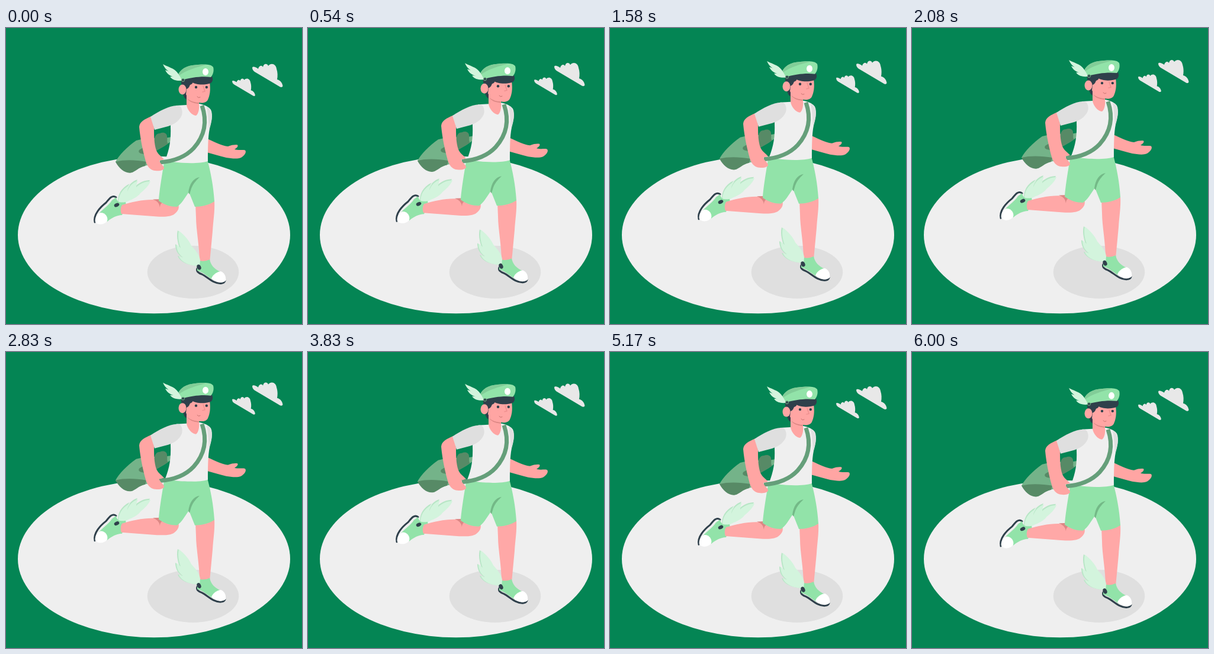
An HTML page for the animation above (6040 ms loop, 500 px wide and 500 px high).

```html
<!DOCTYPE html>
<html lang="en">
<head>
<meta charset="utf-8">
<title>Winged runner</title>
<style>
html, body { margin: 0; width: 100%; height: 100%; overflow: hidden; background: #048554; }
svg { display: block; width: 100vw; height: 100vh; }
.skin { fill: #ffa5a3; }
.leg { fill: #ffa8a7; }
.green { fill: #92e3a9; }
.dark { fill: #2f404b; }
.white { fill: #fff; }
.light { fill: #efefef; }
.cloud { fill: #e8e8e8; }
.shade { fill: #dfdfdf; }
.bag { fill: #74b389; }
.deep { fill: #578a66; }
.wing { fill: #d3f4dd; }
.wing-edge { fill: #b8e6c6; }
.fold { fill: #73b987; }
.blush { fill: #db8784; }
.line { fill: none; stroke-linecap: round; }
.ink { stroke: #2f404b; }
</style>
</head>
<body>
<svg viewBox="0 0 500 500">
  <defs>
    <path id="cloud" d="M416 67C417 64 422 66 426 69C427 64 432 62 434 66C435 60 441 59 443 64C448 58 456 61 457 69C459 75 459 81 458 87C463 88 467 93 467.500 98C467 100 465 100.500 463 99.500L420 74Q416 71 416 67Z"/>
    <path id="backWing" d="M189 297C188 282 194 270 209 263C206 267 204 270 204 274C207 265 213 259 222 256C220 260 219 263 219 267C225 261 234 257 243 257C240 265 232 272 226 277C222 283 212 288 206 290C200 293 195 296 189 297Z"/>
    <path id="frontWing" d="M325 403C318 400 305 401 296 393C293 390 291 388 290 385L297 387C290 382 286 375 286 365L293 371C289 360 288 350 290 342C300 350 307 358 311 367C317 374 325 382 326 392Z"/>
    <path id="hatWing" d="M297 88C290 89 281 88 277 82L283 82C276 80 271 76 269 71L275 73C270 70 267 66 265 61C272 65 280 67 285 71C289 74 291 78 293 81Z"/>
  </defs>

  <ellipse class="light" cx="250" cy="349.400" rx="230" ry="132.800"/>
  <ellipse class="shade" cx="316" cy="412.300" rx="77.200" ry="44.600"/>

  <g id="floating">
    <use href="#cloud" class="cloud"/>
    <use href="#cloud" class="cloud" transform="translate(67.900 39.500) scale(.755)"/>

    <!-- satchel -->
    <path class="bag" d="M185 226C190 216 205 200 220 190C240 184 260 188 280 184L278 192C268 200 258 204 250 210L246 231C233 232 224 236 213 244C202 244 193 236 185 226Z"/>
    <path class="deep" d="M251 188C251 183 254 178 260 178C266 175 272 178 272 183C273 189 271 193 274 195C267 201 258 204 250 210L240 216L232 213C228 212 222 211 225 206C232 201 244 198 251 188Z"/>
    <path class="deep" d="M185 226C200 222 220 223 237 226L235 233C224 235 219 243 211 244.500C202 246 191 238 185 226Z"/>

    <!-- rear leg -->
    <use href="#backWing" class="wing-edge"/>
    <use href="#backWing" class="wing" transform="translate(1 2)"/>
    <path class="line ink" stroke-width="3" d="M186 286C179 281 174 289 169 295C160 302 147 315 150 328"/>
    <path class="green" d="M186 286Q187 292 191 294Q197 295 202 294L203 299L196 316C187 316 178 321 171 327L154 317C160 308 174 300 179 291Z"/>
    <path class="leg" d="M196 299C215 293 240 288 259 291L290 294C294 303 291 308 287 312C281 319 269 319 255 318.500L195 314Q192 306 196 299Z"/>
    <path class="blush" d="M248 289.500L264 289L266 294Q260 296 260 303Q259 293 248 289.500Z"/>
    <path class="white" d="M151 328C149 322 154 314 159 312C167 311 173 319 171 326C167 332 156 334 151 328Z"/>
    <ellipse class="dark" cx="187" cy="299" rx="4.500" ry="3" transform="rotate(-25 187 299)"/>

    <!-- standing leg -->
    <path class="leg" d="M320 297L352 292C353 310 350 325 349 343L344 396H327C327 370 321 340 321 320Z"/>
    <path class="line ink" stroke-width="3" d="M323 406C321 411 325 414 331 416C341 421 350 432 363 431.500Q369 431 370 427"/>
    <path class="green" d="M327 393Q336 395 344 391C346 401 352 407 362 412L349 425C340 420 333 412 323 410Q322 401 327 393Z"/>
    <path class="white" d="M347 423C350 416 356 412 363 411C370 414 372 421 371 427C366 432 354 430 347 423Z"/>
    <use href="#frontWing" class="wing-edge"/>
    <use href="#frontWing" class="wing" transform="translate(2 .5)"/>
    <ellipse class="dark" cx="326" cy="404" rx="3.300" ry="4.700" transform="rotate(-25 326 404)"/>

    <!-- far arm and shorts -->
    <path class="skin" d="M341 187.500C355 194 365 199 375 200C382 197 388 197 391 197.500C393 200 389 203 386 205C393 207 400 205 404 206.500C407 210 402 216 397 219C390 222 380 220 372 219C360 216 350 213 339 210Z"/>
    <path class="green" d="M268 222C290 229 325 230 340 222C346 245 350 265 352 293C343 299 330 302 319 302L309 277C300 290 297 296 289 302C278 302 268 299 258 292C259 275 264 245 268 222Z"/>
    <path class="fold" d="M308 278C310 263 316 254 327 252Q316 262 313 271L310 281Z"/>

    <!-- shirt -->
    <path class="light" d="M287 131L305 130L327 128Q341 131 346 138C350 146 347 160 344 170C341 185 341 205 341 225C325 230 290 229 269 223C276 205 279 190 278 165Z"/>
    <path class="shade" d="M339 133C347 137 349 147 347 157L343 172Q342 150 339 133Z"/>
    <path class="line" stroke="#659f7a" stroke-width="7" style="stroke-linecap:butt" d="M331 131C341 160 334 184 317 203C304 217 285 225 260 227"/>

    <!-- near arm -->
    <path class="skin" d="M246 149C234 154 226 158 225 167C227 190 233 215 237 228C240 236 246 241 252 241C260 242 268 240 267 236C265 231 260 229 259 224L267 222C262 216 258 215 254 207C250 195 250 182 250 168Z"/>
    <path class="shade" d="M244 150C258 141 275 131 289 131C297 130 299 141 297 147C293 158 280 165 270 167L251 172Z"/>

    <!-- head -->
    <path class="skin" d="M305 108V130C306 138 314 148 321 148C325 145 327 137 326 128V112Z"/>
    <path class="blush" d="M306 119Q314 126 326 126L325 128Q311 127 306 119Z"/>
    <path class="dark" d="M295 86L320 88L316 96L305 104V121Q300 118 299 110Z"/>
    <path class="skin" d="M305 103C309 102 310 98 311 96Q315 95 316 91L344 92C346 105 344 115 341 121C338 128 328 127 320 125C312 123 307 119 304 112Z"/>
    <ellipse class="skin" cx="298" cy="104" rx="6.500" ry="8.500"/>
    <path class="line" stroke="#ee908f" stroke-width="1.500" d="M333 98L336 107L332 108"/>
    <path class="line" stroke="#c87370" stroke-width="1" d="M323 116Q325 119 328 117"/>
    <circle class="dark" cx="321" cy="100" r="2.200"/>
    <circle class="dark" cx="338.800" cy="100" r="2.200"/>

    <!-- cap -->
    <path class="dark" d="M296 84L347 81C350 84 350 90 346 93C335 97 321 96 315 92C309 90 304 93 299 93Z"/>
    <path class="green" d="M290 83C291 74 300 65 315 63C330 61 346 60 350 66C352 73 349 80 346 83C330 81 312 84 301 87C295 87 292 85 290 83Z"/>
    <path fill="#82cd98" d="M290 82C291 74 300 65 315 63Q328 61 338 62C322 67 305 70 290 82Z"/>
    <ellipse class="white" cx="337" cy="74" rx="5" ry="6"/>
    <use href="#hatWing" class="wing-edge"/>
    <use href="#hatWing" class="wing" transform="translate(.7 .7)"/>
    <circle cx="299" cy="88" r="2.500" fill="#2f404b" stroke="#73b987"/>
  </g>
</svg>
<script>
const LOOP = 6040, LIFT = 10;
const floating = document.getElementById("floating");

function draw() {
  const phase = performance.now() % LOOP / LOOP;
  const rise = LIFT * (1 - Math.abs(1 - 2 * phase));
  floating.setAttribute("transform", `translate(0 ${-rise})`);
  requestAnimationFrame(draw);
}
draw();
</script>
</body>
</html>
```
